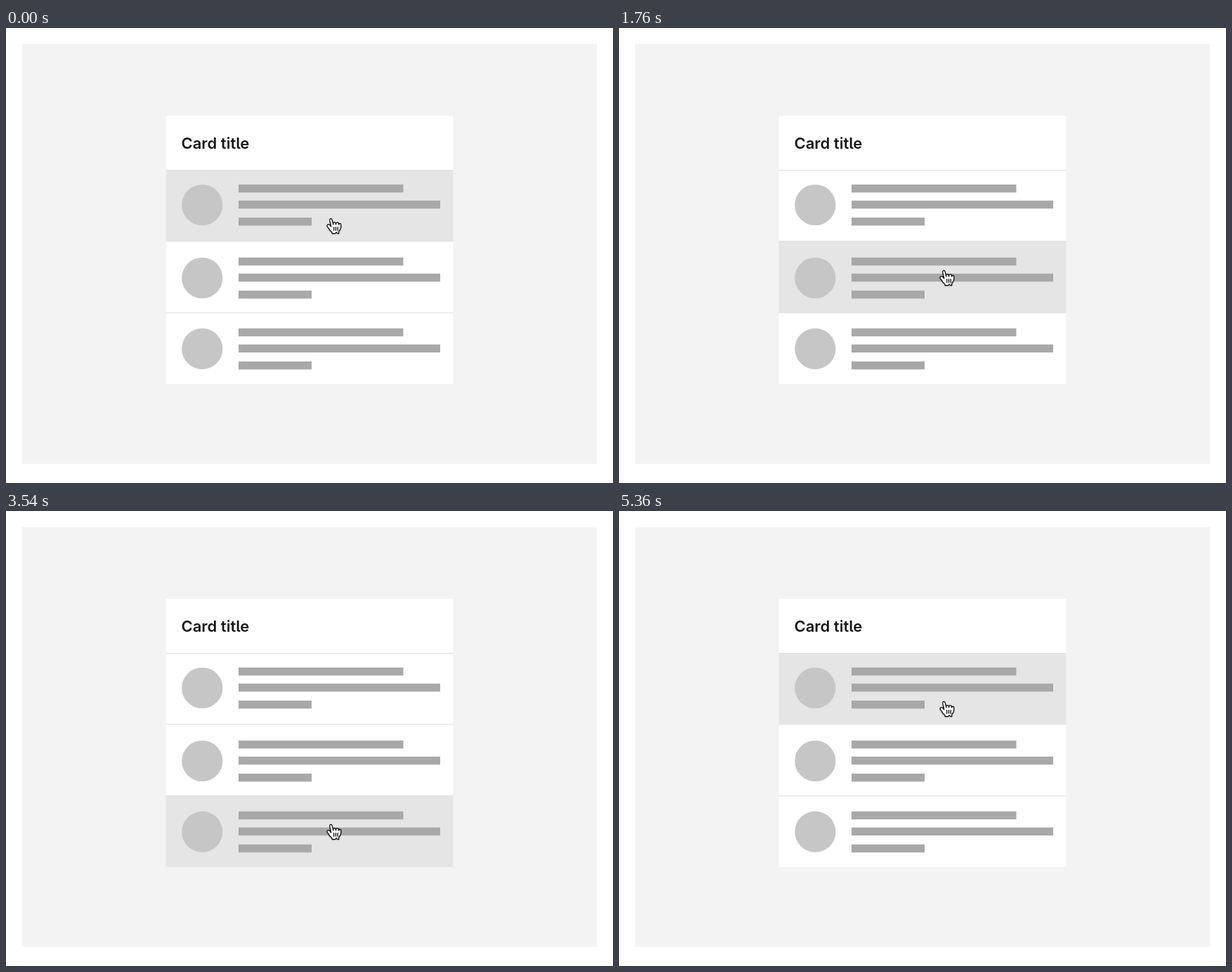
Recreate the animation shown at these times as an HTML page with a canvas. Size 864 px wide and 648 px high, loop 6460 ms.

```html
<!DOCTYPE html>
<html lang="en">
<head>
<meta charset="utf-8">
<title>Card hover states</title>
<style>
  html, body { margin: 0; width: 100%; height: 100%; overflow: hidden; background: #fff; }
  canvas, svg { position: absolute; left: 0; top: 0; display: block; }
  text {
    font: 600 22px Inter, "Open Sans", sans-serif;
    font-feature-settings: "cv05";
    fill: #161616;
  }
</style>
</head>
<body>
<canvas id="stage" width="864" height="648"></canvas>
<svg width="864" height="648"><text x="249.5" y="172">Card title</text></svg>
<script>
const ctx = document.getElementById('stage').getContext('2d');
const LOOP = 6460, TICK = 20;

const CARD = { x: 227.4, y: 125, w: 409.2, h: 382 };
const ROWS = [
  { top: 202.1, bottom: 303.2, content: 222.9 },
  { top: 303.2, bottom: 405.1, content: 326.9 },
  { top: 405.1, bottom: 507, content: 427.8 }
];
const BARS = [[0, 234.5], [22.9, 287], [47.1, 104]];

// Pointer moves: the hovered row switches as soon as the move begins.
const MOVES = [
  { start: 1420, end: 1760, from: 0, to: 74, row: 1 },
  { start: 3180, end: 3540, from: 74, to: 175, row: 2 },
  { start: 5000, end: 5360, from: 175, to: 0, row: 0 }
];

const HAND = new Path2D('M11.3 20.4c-.3-.4-.6-1.1-1.2-2-.3-.5-1.2-1.5-1.5-1.9-.2-.4-.2-.6-.1-1 ' +
  '.1-.6.7-1.1 1.4-1.1.5 0 1 .4 1.4.7.2.2.5.6.7.8.2.2.2.3.4.5.2.3.3.5.2.1-.1-.5-.2-1.3-.4-2.1' +
  '-.1-.6-.2-.7-.3-1.1-.1-.5-.2-.8-.3-1.3-.1-.3-.2-1.1-.3-1.5-.1-.5-.1-1.4.3-1.8.3-.3.9-.4 1.3-.2' +
  '.5.3.8 1 .9 1.3.2.5.4 1.2.5 2 .2 1 .5 2.5.5 2.8 0-.4-.1-1.1 0-1.5.1-.3.3-.7.7-.8.3-.1.6-.1.9-.1' +
  '.3.1.6.3.8.5.4.6.4 1.9.4 1.8.1-.4.1-1.2.3-1.6.1-.2.5-.4.7-.5.3-.1.7-.1 1 0 .2 0 .6.3.7.5' +
  '.2.3.3 1.3.4 1.7 0 .1.1-.4.3-.7.4-.6 1.8-.8 1.9.6v1.9c0 .5-.1 1.6-.3 2.1-.1.3-.4 1.2-.7 1.6' +
  ' 0 0-1.1 1.2-1.2 1.8-.1.6-.1.6-.1 1 0 .4.1.9.1.9s-.8.1-1.2 0c-.4-.1-.9-.8-1-1.1-.2-.3-.5-.3-.7 0' +
  '-.2.4-.7 1.1-1.1 1.1-.7.1-2.1 0-3.1 0 0 0 .2-1-.2-1.4-.3-.3-.8-.8-1.1-1.1z');
const FINGERS = new Path2D('M15.6 17.2v3.5M17.6 17.2v3.5M19.6 17.2v3.5');

// Cubic Bezier easing (.25, .1, .25, 1), solved by bisection.
function ease(x) {
  if (x <= 0) return 0;
  if (x >= 1) return 1;
  const curve = (s, a, b) => 3 * a * s * (1 - s) ** 2 + 3 * b * s * s * (1 - s) + s ** 3;
  let lo = 0, hi = 1;
  for (let i = 0; i < 24; i++) {
    const mid = (lo + hi) / 2;
    if (curve(mid, 0.25, 0.25) < x) lo = mid; else hi = mid;
  }
  return curve(lo, 0.1, 1);
}

function rect(color, x, y, w, h) {
  ctx.fillStyle = color;
  ctx.fillRect(x, y, w, h);
}

function drawRow(row, hovered) {
  if (hovered) rect('#e5e5e5', CARD.x, row.top, CARD.w, row.bottom - row.top);
  ctx.fillStyle = '#c6c6c6';
  ctx.beginPath();
  ctx.arc(279.3, row.content + 29.1, 29.1, 0, Math.PI * 2);
  ctx.fill();
  for (const [dy, w] of BARS) rect('#a8a8a8', 331, row.content + dy, w, 11.4);
}

function drawHand(y) {
  ctx.save();
  ctx.translate(445.4, 260 + y);
  ctx.scale(1.37, 1.37);
  ctx.lineJoin = ctx.lineCap = 'round';
  ctx.lineWidth = 0.9;
  ctx.strokeStyle = '#000';
  ctx.fillStyle = '#fff';
  ctx.save();
  ctx.shadowColor = 'rgba(0, 0, 0, .35)';
  ctx.shadowOffsetY = 1.2;
  ctx.shadowBlur = 2;
  ctx.fill(HAND);
  ctx.restore();
  ctx.stroke(HAND);
  ctx.stroke(FINGERS);
  ctx.restore();
}

function poseAt(t) {
  let y = 0, row = 0;
  for (const m of MOVES) {
    if (t <= m.start) break;
    y = m.from + (m.to - m.from) * ease((t - m.start) / (m.end - m.start));
    row = m.row;
  }
  return { y, row };
}

function draw(t) {
  const pose = poseAt(Math.floor(t / TICK) * TICK);
  rect('#fff', 0, 0, 864, 648);
  rect('#f3f3f3', 22.7, 22.7, 818.6, 598);
  rect('#fff', CARD.x, CARD.y, CARD.w, CARD.h);
  ROWS.forEach((row, i) => drawRow(row, i === pose.row));
  for (const row of ROWS) rect('#e0e0e0', CARD.x, row.top, CARD.w, 1.2);
  drawHand(pose.y);
}

const begin = performance.now();
function frame() {
  draw((performance.now() - begin) % LOOP);
  requestAnimationFrame(frame);
}
frame();
</script>
</body>
</html>
```
